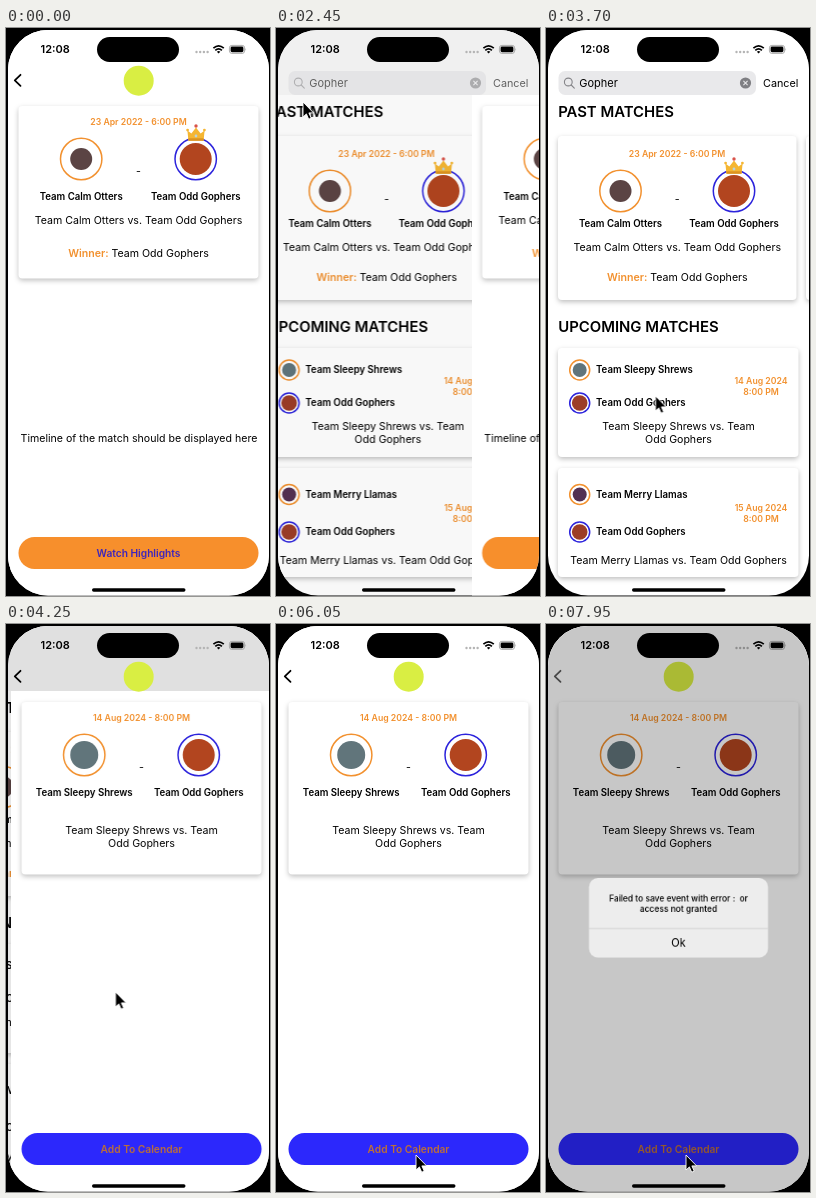
Animation, 264 px wide and 568 px high, one loop 8000 ms. Source, as an HTML page:

```html
<!DOCTYPE html>
<html lang="en">
<head>
<meta charset="utf-8">
<title>Match details</title>
<style>
  html, body { margin: 0; width: 100%; height: 100%; overflow: hidden; background: #000; }
  svg { display: block; width: 264px; height: 568px; }
  text { font: 400 10.6px Inter, "Open Sans", sans-serif; fill: #000; white-space: pre; }
  .mid { text-anchor: middle; }
  .name { font-size: 9.65px; font-weight: 600; }
  .date { font-size: 8.7px; font-weight: 600; fill: #f2912f; }
  .title { font-size: 14.9px; font-weight: 600; }
  .win { font-weight: 600; fill: #f2912f; }
  .label { font-size: 10.2px; font-weight: 600; }
  .small { font-size: 8.45px; font-weight: 500; }
  .card { fill: #fff; filter: drop-shadow(0 2px 2.5px rgba(0, 0, 0, .25)); }
  .ring { fill: #fff; stroke: #f2912f; stroke-width: 1.5; }
  .away { stroke: #2c23dc; }

  .anim { animation: 8s linear infinite; }
  #list { animation-name: list; }
  #shade { animation-name: shade; }
  #past { animation-name: past; }
  #next { animation-name: next; }
  #bar { animation-name: bar; }
  #search { animation-name: search; }
  #brand { animation-name: brand; }
  #back { animation-name: back; }
  #dim { animation-name: dim; }
  #alert { animation-name: alert; transform-origin: 132.5px 294px; }
  #cursor { animation-name: cursor; }

  /* page slides, 500 ms each: pop at 2336 ms, push at 3900 ms */
  @keyframes list {
    0% { transform: translateX(-79px); }
    29.2% { transform: translateX(-79px); animation-timing-function: cubic-bezier(.32, .72, 0, 1); }
    35.45% { transform: none; }
    48.75% { transform: none; animation-timing-function: cubic-bezier(.32, .72, 0, 1); }
    55%, 100% { transform: translateX(-79px); }
  }
  @keyframes shade {
    0% { opacity: .1; }
    29.2% { opacity: .1; animation-timing-function: cubic-bezier(.32, .72, 0, 1); }
    35.45% { opacity: 0; }
    48.75% { opacity: 0; animation-timing-function: cubic-bezier(.32, .72, 0, 1); }
    55%, 100% { opacity: .1; }
  }
  @keyframes past {
    0% { transform: none; }
    29.2% { transform: none; animation-timing-function: cubic-bezier(.32, .72, 0, 1); }
    35.45%, 100% { transform: translateX(262px); }
  }
  @keyframes next {
    0% { transform: translateX(262px); }
    48.75% { transform: translateX(262px); animation-timing-function: cubic-bezier(.32, .72, 0, 1); }
    55%, 100% { transform: none; }
  }
  @keyframes bar {
    0%, 29.2% { fill: #fff; }
    29.21%, 35.44% { fill: #f0f0f0; }
    35.45%, 48.75% { fill: #fff; }
    48.76%, 55% { fill: #e0e0e0; }
    55.01%, 100% { fill: #fff; }
  }
  @keyframes search {
    0%, 29.2% { opacity: 0; }
    31.6%, 48.75% { opacity: 1; }
    51.25%, 100% { opacity: 0; }
  }
  @keyframes brand {
    0%, 29.2% { opacity: 1; }
    30.5%, 48.75% { opacity: 0; }
    52%, 100% { opacity: 1; }
  }
  @keyframes back {
    0%, 92.5% { stroke: #000; }
    96%, 100% { stroke: #5c5c5c; }
  }
  @keyframes dim {
    0%, 92.5% { opacity: 0; }
    96%, 100% { opacity: .22; }
  }
  @keyframes alert {
    0% { opacity: 0; transform: scale(1.15); }
    92.5% { opacity: 0; transform: scale(1.15); animation-timing-function: ease-out; }
    97%, 100% { opacity: 1; transform: none; }
  }
  @keyframes cursor {
    0%, 13.74% { opacity: 0; transform: translate(192px, 514px); }
    13.75% { opacity: 1; transform: translate(192px, 514px); }
    18.125% { transform: translate(51px, 181px); animation-timing-function: ease-out; }
    23.75% { transform: translate(9px, 52px); }
    25%, 28.125% { transform: translate(9px, 57px); }
    30.625% { transform: translate(27px, 74px); animation-timing-function: ease-in-out; }
    40%, 60% { transform: translate(109.5px, 368px); animation-timing-function: ease-in-out; }
    71%, 100% { opacity: 1; transform: translate(140px, 531px); }
  }
</style>
</head>
<body>
<svg viewBox="0 0 264 568">
  <defs>
    <clipPath id="screen"><rect x="2" y="2" width="261" height="565.5" rx="40"/></clipPath>
    <g id="crown">
      <path d="M-7.6 8L-8.6 -2L-4.6 1L0 -5L4.6 1L8.6 -2L7.6 8Z" fill="#f5b632"/>
      <path d="M-7.6 5.8H7.6V8.3H-7.6Z" fill="#dc9320"/>
      <g fill="#f5b632"><circle cx="-8.4" cy="-2.4" r="1.4"/><circle cx="8.4" cy="-2.4" r="1.4"/></g>
      <circle cy="-6.5" r="1.7" fill="#d9534a"/>
      <circle cy="3.5" r="1.4" fill="#b9d3da"/>
    </g>
    <g id="otters"><circle class="ring" r="20.7"/><circle r="11" fill="#5b4444"/></g>
    <g id="gophers"><circle class="ring away" r="20.7"/><circle r="16" fill="#b2451f"/></g>
    <g id="shrews"><circle class="ring" r="20.7"/><circle r="14" fill="#61757b"/></g>
    <g id="gopher-row"><circle class="ring away" r="10"/><circle r="7.8" fill="#9c3d27"/></g>
  </defs>

  <rect width="264" height="568"/>
  <g clip-path="url(#screen)">
    <rect width="264" height="568" fill="#fff"/>

    <g id="list" class="anim">
      <text class="title" x="12.2" y="89">PAST MATCHES</text>
      <rect class="card" x="12" y="108" width="238.5" height="164" rx="4"/>
      <rect class="card" x="260" y="108" width="238" height="164" rx="4"/>
      <text class="date mid" x="131" y="129">23 Apr 2022 - 6:00 PM</text>
      <use href="#otters" x="74.5" y="163"/>
      <use href="#gophers" x="188" y="163"/>
      <use href="#crown" x="188" y="137.5"/>
      <text class="mid" x="131.3" y="175">-</text>
      <text class="name mid" x="74.5" y="199.2">Team Calm Otters</text>
      <text class="name mid" x="188" y="199.2">Team Odd Gophers</text>
      <text class="mid" x="131.3" y="223">Team Calm Otters vs. Team Odd Gophers</text>
      <text class="mid" x="131.3" y="253"><tspan class="win">Winner:</tspan> Team Odd Gophers</text>

      <text class="title" x="12.2" y="304">UPCOMING MATCHES</text>
      <rect class="card" x="12" y="320" width="240.5" height="109" rx="4"/>
      <g transform="translate(33.7 342)"><circle class="ring" r="10"/><circle r="7" fill="#61757b"/></g>
      <use href="#gopher-row" x="33.7" y="375"/>
      <text class="name" x="50" y="345.3">Team Sleepy Shrews</text>
      <text class="name" x="50" y="378.3">Team Odd Gophers</text>
      <text class="date mid" x="215" y="356.3">14 Aug 2024</text>
      <text class="date mid" x="215" y="366.6">8:00 PM</text>
      <text class="mid" x="132.5" y="402">Team Sleepy Shrews vs. Team</text>
      <text class="mid" x="132.5" y="415">Odd Gophers</text>

      <rect class="card" x="12" y="440" width="240.5" height="109" rx="4"/>
      <g transform="translate(33.7 466.5)"><circle class="ring" r="10"/><circle r="7" fill="#533052"/></g>
      <use href="#gopher-row" x="33.7" y="504"/>
      <text class="name" x="50" y="469.8">Team Merry Llamas</text>
      <text class="name" x="50" y="507.3">Team Odd Gophers</text>
      <text class="date mid" x="215" y="483.3">15 Aug 2024</text>
      <text class="date mid" x="215" y="493.6">8:00 PM</text>
      <text class="mid" x="132.5" y="536">Team Merry Llamas vs. Team Odd Gophers</text>
    </g>
    <rect id="shade" class="anim" width="264" height="568"/>

    <g id="past" class="anim">
      <rect x="2" width="264" height="568" fill="#fff"/>
      <rect class="card" x="12.5" y="78" width="240" height="172.5" rx="4"/>
      <text class="date mid" x="132.5" y="97">23 Apr 2022 - 6:00 PM</text>
      <use href="#otters" x="75.2" y="131"/>
      <use href="#gophers" x="189.7" y="131"/>
      <use href="#crown" x="190" y="104.5"/>
      <text class="mid" x="132.5" y="146.5">-</text>
      <text class="name mid" x="75.2" y="172.2">Team Calm Otters</text>
      <text class="name mid" x="189.7" y="172.2">Team Odd Gophers</text>
      <text class="mid" x="132.5" y="196">Team Calm Otters vs. Team Odd Gophers</text>
      <text class="mid" x="132.5" y="229"><tspan class="win">Winner:</tspan> Team Odd Gophers</text>
      <text class="mid" x="133" y="414">Timeline of the match should be displayed here</text>
      <rect x="12.5" y="509" width="240" height="32" rx="16" fill="#f78f2c"/>
      <text class="label mid" x="132.5" y="528.7" style="fill:#3d25bd">Watch Highlights</text>
    </g>

    <g id="next" class="anim">
      <rect x="2" width="264" height="568" fill="#fff"/>
      <rect class="card" x="12.5" y="78" width="240" height="172.5" rx="4"/>
      <text class="date mid" x="132.5" y="97">14 Aug 2024 - 8:00 PM</text>
      <use href="#shrews" x="75.2" y="131"/>
      <use href="#gophers" x="189.7" y="131"/>
      <text class="mid" x="132.5" y="146.5">-</text>
      <text class="name mid" x="75.2" y="172.2">Team Sleepy Shrews</text>
      <text class="name mid" x="189.7" y="172.2">Team Odd Gophers</text>
      <text class="mid" x="132.5" y="210">Team Sleepy Shrews vs. Team</text>
      <text class="mid" x="132.5" y="223">Odd Gophers</text>
      <rect x="12.5" y="509" width="240" height="32" rx="16" fill="#2c28fc"/>
      <text class="label mid" x="132.5" y="528.7" style="fill:#bd6f38">Add To Calendar</text>
    </g>

    <rect id="bar" class="anim" width="264" height="67"/>
    <g id="search" class="anim">
      <rect x="12.5" y="43" width="197.5" height="24" rx="6.5" fill="#767680" fill-opacity=".16"/>
      <g fill="none" stroke="#858589" stroke-width="1.1" stroke-linecap="round">
        <circle cx="22.3" cy="54" r="3.9"/><path d="M25.2 57L28.3 60.2"/>
      </g>
      <text x="33.3" y="59" style="font-size:11px">Gopher</text>
      <circle cx="199.5" cy="55" r="5.6" fill="#7f7f83"/>
      <path d="M197.4 52.9l4.2 4.2m0-4.2l-4.2 4.2" stroke="#e6e6e8" stroke-width="1.1"/>
      <text x="217" y="59" style="font-size:10.8px">Cancel</text>
    </g>
    <g id="brand" class="anim">
      <path id="back" class="anim" d="M14.5 46.8L8.8 52.3L14.5 57.8" fill="none" stroke-width="1.8" stroke-linecap="round" stroke-linejoin="round"/>
      <circle cx="132.7" cy="52.7" r="15" fill="#d9ee43"/>
    </g>

    <text x="34.5" y="25" style="font-size:11px;font-weight:600">12:08</text>
    <g fill="#b4b4b4">
      <circle cx="190.5" cy="24" r="1.2"/><circle cx="194.2" cy="24" r="1.2"/>
      <circle cx="197.9" cy="24" r="1.2"/><circle cx="201.6" cy="24" r="1.2"/>
    </g>
    <g fill="none" stroke="#000" stroke-width="1.7">
      <path d="M207.4 20.2Q212.6 15.4 217.8 20.2"/><path d="M209.3 22.4Q212.6 19.4 215.9 22.4"/>
    </g>
    <path d="M210.9 23.8Q212.6 22.4 214.3 23.8L212.6 25.6Z"/>
    <rect x="223.4" y="17.4" width="15.2" height="8" rx="2.4" fill="none" stroke="#9a9a9a" stroke-width=".8"/>
    <rect x="224.6" y="18.6" width="12.8" height="5.6" rx="1.4"/>
    <path d="M239.5 20v2.8q1.2-1.4 0-2.8" fill="#9a9a9a"/>

    <rect id="dim" class="anim" width="264" height="568"/>
    <g id="alert" class="anim">
      <rect x="43" y="254" width="179" height="79.5" rx="9" fill="#ededed"/>
      <path d="M43 304.5H222" stroke="#cbcbcb" stroke-width=".8"/>
      <text class="small mid" x="132.5" y="277.2">Failed to save event with error :  or</text>
      <text class="small mid" x="132.5" y="288.2">access not granted</text>
      <text class="mid" x="132.5" y="323" style="font-size:11.2px">Ok</text>
    </g>
  </g>
  <rect x="91" y="9" width="82" height="25" rx="12.5"/>
  <rect x="86" y="560.3" width="93.5" height="3.4" rx="1.7"/>
  <path id="cursor" class="anim" d="M0 0V15L3.4 11.9L5.7 17.2L8.2 16.1L5.9 10.9H10.6Z" stroke="#fff" stroke-width=".9" stroke-linejoin="round"/>
</svg>
</body>
</html>
```
